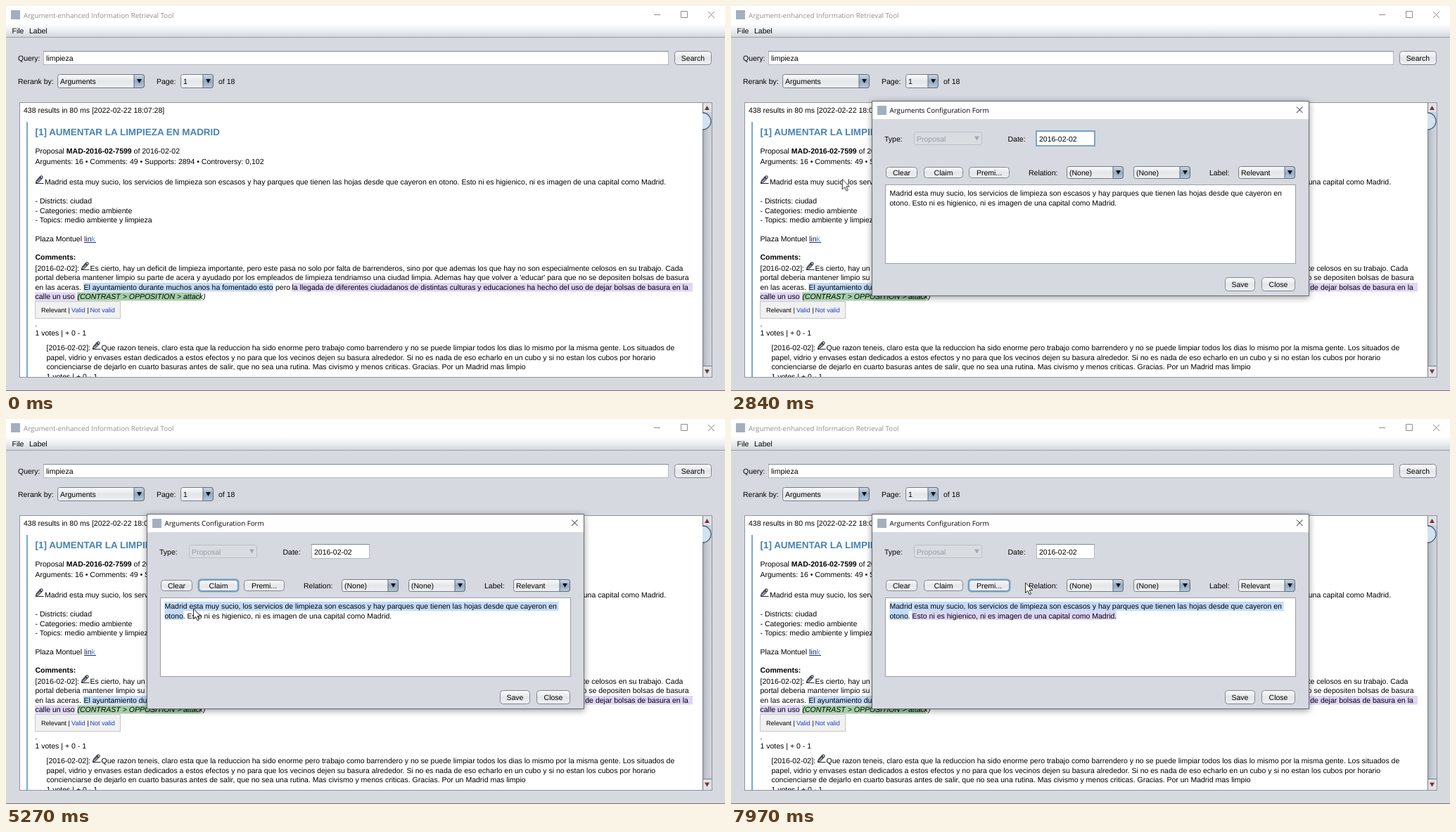
An HTML page for the animation above (8000 ms loop, 1022 by 548 pixels).

```html
<!DOCTYPE html>
<html lang="en">
<head>
<meta charset="utf-8">
<title>Argument search tool</title>
<style>
html, body { margin: 0; width: 100%; height: 100%; overflow: hidden; background: #d6d9df; }
svg { display: block; width: 1022px; height: 548px; }
text {
  font: 10.5px "Liberation Sans", Arial, sans-serif;
  fill: #000; white-space: pre; text-rendering: geometricPrecision;
}
.caption { font: 9.75px "Open Sans", "Noto Sans", sans-serif; }
.heading { font-size: 13.45px; font-weight: bold; fill: #4682b4; }
.bold { font-weight: bold; }
.small { font-size: 9.1px; }
.link { fill: #1a3fc4; }
.muted { fill: #9a9da3; }
.selected text { fill: #fff; }
.claim { fill: #c3dcf8; }
.premise { fill: #dfd5f6; }
.glyph { fill: none; stroke: #8c8c8c; }
.focus { fill: none; stroke: #6fa0cf; stroke-width: 1.8; }

/* Switches: hard on and off */
.switch { opacity: 0; animation: 8s step-end infinite; }
#activeTitle { animation-name: title-on; }
#arrow { animation-name: arrow-on; }
#hand { animation-name: hand-on; }
#press { animation-name: press-on; }
#dateFocus { animation-name: date-on; }
#areaFocus { animation-name: area-on; }
#claimFocus { animation-name: claim-focus; }
#premiseFocus { animation-name: premise-focus; }
#claimMark { animation-name: claim-on; }
#premiseMark { animation-name: premise-on; }
@keyframes title-on { 0%, 21.625% { opacity: 0 } 20.5% { opacity: 1 } }
@keyframes arrow-on { 0%, 17.875% { opacity: 0 } 9.375%, 31.125%, 100% { opacity: 1 } }
@keyframes hand-on { 0%, 31.125% { opacity: 0 } 17.875% { opacity: 1 } }
@keyframes press-on {
  0%, 21.625%, 51.625%, 60.875%, 83.75%, 95.75% { opacity: 0 }
  20.5%, 44%, 59.75%, 72.75%, 93.375% { opacity: .78 }
}
@keyframes date-on { 0% { opacity: 1 } 44%, 100% { opacity: 0 } }
@keyframes area-on { 0%, 59.75%, 93.375%, 100% { opacity: 0 } 44%, 72.75% { opacity: 1 } }
@keyframes claim-focus { 0%, 72.75%, 100% { opacity: 0 } 59.75% { opacity: 1 } }
@keyframes premise-focus { 0% { opacity: 0 } 93.375%, 100% { opacity: 1 } }
@keyframes claim-on { 0% { opacity: 0 } 60.875%, 100% { opacity: 1 } }
@keyframes premise-on { 0% { opacity: 0 } 95.75%, 100% { opacity: 1 } }

/* Dragged text selections */
#sel1 { animation: sel1 8s linear infinite; }
#sel2 { animation: sel2 8s linear infinite; }
#sel3 { animation: sel3 8s linear infinite; }
@keyframes sel1 {
  0%, 44% { width: 0 } 45.875%, 46.374% { width: 7.5px }
  46.375%, 59.749% { width: 560px } 59.75%, 100% { width: 0 }
}
@keyframes sel2 {
  0%, 46.374% { width: 0 } 46.375% { width: 14px }
  47.375%, 59.749% { width: 26px } 59.75%, 100% { width: 0 }
}
@keyframes sel3 {
  0%, 72.75% { width: 0 } 78.125% { width: 212px } 82.125% { width: 288px }
  82.875%, 93.374% { width: 291px } 93.375%, 100% { width: 0 }
}

#dialog { transform-origin: 511px 274px; animation: open 8s ease-out infinite; }
@keyframes open {
  0%, 21.625% { opacity: 0; transform: scale(.92) }
  23.125%, 100% { opacity: 1; transform: none }
}

#pointer { animation: move 8s ease-in-out infinite; }
@keyframes move {
  0%, 9.375% { transform: translate(612px, 420px) }
  11.375%, 14.125% { transform: translate(80px, 216px) }
  18.25%, 31.125% { transform: translate(49px, 247px) }
  34% { transform: translate(110px, 238px); animation-timing-function: linear }
  38% { transform: translate(236px, 260px) }
  40.125%, 44% { transform: translate(225px, 266px) }
  45.875% { transform: translate(235px, 271px); animation-timing-function: linear }
  47.375%, 55.125% { transform: translate(250px, 281px) }
  58.75%, 62% { transform: translate(290px, 238px) }
  65.125% { transform: translate(274px, 263px); animation-timing-function: linear }
  65.875% { transform: translate(266px, 270px) }
  69.625% { transform: translate(259px, 274px) }
  72.75% { transform: translate(259px, 274px); animation-timing-function: linear }
  78.125% { transform: translate(469px, 286px); animation-timing-function: linear }
  82.125% { transform: translate(545px, 288px) }
  82.875%, 87.25% { transform: translate(547px, 288px) }
  91.5%, 99.624% { transform: translate(357px, 232px) }
  99.625%, 100% { transform: translate(418px, 233px) }
}
</style>
</head>
<body>
<svg viewBox="0 0 1022 548">
  <defs>
    <linearGradient id="menuFill" x2="0" y2="1"><stop stop-color="#fff"/><stop offset=".5" stop-color="#eceef1"/><stop offset="1" stop-color="#d3d6dc"/></linearGradient>
    <linearGradient id="buttonFill" x2="0" y2="1"><stop stop-color="#fcfcfd"/><stop offset=".5" stop-color="#e3e6ea"/><stop offset="1" stop-color="#eff1f4"/></linearGradient>
    <linearGradient id="arrowFill" x2="0" y2="1"><stop stop-color="#cfdbe8"/><stop offset=".5" stop-color="#94a9c0"/><stop offset="1" stop-color="#b9cadb"/></linearGradient>
    <linearGradient id="trackFill" x2="1"><stop stop-color="#a9aeb9"/><stop offset=".5" stop-color="#c6cad2"/><stop offset="1" stop-color="#d2d5dc"/></linearGradient>
    <clipPath id="page"><rect x="20" y="138" width="970" height="390"/></clipPath>
    <clipPath id="bar"><rect x="990" y="138" width="13" height="390"/></clipPath>
    <clipPath id="dragged">
      <rect id="sel1" x="225.5" y="260" width="0" height="13"/>
      <rect id="sel2" x="225.5" y="273" width="0" height="13.5"/>
      <rect id="sel3" x="257" y="273" width="0" height="13.5"/>
    </clipPath>
    <g id="pencil" fill="#fff" stroke="#1d2433" stroke-width="1.1" stroke-linejoin="round">
      <path d="M1.5 10.5 2.5 7.3 8.2 1.2Q9.4.3 10.5 1.3T10.8 3.6L5 9.7Z"/>
      <path d="M7 2.5 9.5 5M3.4 8.4 9 2.6M1 11.5H12.5" fill="none"/>
    </g>
    <g id="message">
      <text x="225.5" y="270">Madrid esta muy sucio, los servicios de limpieza son escasos y hay parques que tienen las hojas desde que cayeron en</text>
      <text x="225.5" y="283.5">otono. Esto ni es higienico, ni es imagen de una capital como Madrid.</text>
    </g>
  </defs>

  <rect width="1022" height="548" fill="#d6d9df"/>
  <rect width="1022" height="25" fill="#fff"/>
  <rect x="7" y="6" width="13" height="13" fill="#a3afbf"/>
  <text class="caption" x="25" y="16.5" style="fill:#8f8f8f">Argument-enhanced Information Retrieval Tool</text>
  <text class="caption switch" id="activeTitle" x="25" y="16.5">Argument-enhanced Information Retrieval Tool</text>
  <path class="glyph" d="M921 12.5h9M959.5 7.5h9v9h-9zM998 8l9 9M1007 8l-9 9"/>
  <rect y="25" width="1022" height="19" fill="url(#menuFill)"/>
  <path d="M0 44.5H1022" stroke="#9ba0aa"/>
  <path d="M0 547.5H1022" stroke="#806c78"/>
  <text x="8.5" y="39">File</text>
  <text x="33" y="39">Label</text>
  <text x="17" y="78">Query:</text>
  <text x="17" y="111">Rerank by:</text>
  <text x="214" y="111">Page:</text>
  <text x="302" y="111">of 18</text>
  <g id="mainControls"></g>

  <rect x="19.5" y="137.5" width="984" height="391" fill="#fff" stroke="#8f949e"/>
  <g clip-path="url(#page)">
    <path d="M30 165V528" stroke="#5d92bf" stroke-width="1.6"/>
    <rect class="claim" x="110" y="394" width="270" height="12.5"/>
    <rect class="premise" x="406" y="394" width="570" height="12.5"/>
    <rect class="premise" x="41" y="407.5" width="58.5" height="12"/>
    <rect x="101" y="407.5" width="176.5" height="12" fill="#a5cda9"/>
    <text x="25" y="152">438 results in 80 ms [2022-02-22 18:07:28]</text>
    <text class="heading" x="41.5" y="184">[1] AUMENTAR LA LIMPIEZA EN MADRID</text>
    <text x="41.5" y="209.5">Proposal <tspan class="bold">MAD-2016-02-7599</tspan> of 2016-02-02</text>
    <text x="41.5" y="225">Arguments: 16 • Comments: 49 • Supports: 2894 • Controversy: 0,102</text>
    <use href="#pencil" x="41" y="241"/>
    <text x="55" y="254">Madrid esta muy sucio, los servicios de limpieza son escasos y hay parques que tienen las hojas desde que cayeron en otono. Esto ni es higienico, ni es imagen de una capital como Madrid.</text>
    <text x="41.5" y="281">- Districts: ciudad</text>
    <text x="41.5" y="294.5">- Categories: medio ambiente</text>
    <text x="41.5" y="308">- Topics: medio ambiente y limpieza</text>
    <text x="41.5" y="334.5">Plaza Montuel</text>
    <text x="111" y="334.5" style="fill:#141c55">lin<tspan fill="#4d8fe0">k</tspan></text>
    <path d="M111 336.5h17" stroke="#24307a"/>
    <text class="bold" x="41.5" y="360.5">Comments:</text>
    <text x="41.5" y="377">[2016-02-02]:</text>
    <use href="#pencil" x="106" y="364"/>
    <text x="119.5" y="377">Es cierto, hay un deficit de limpieza importante, pero este pasa no solo por falta de barrenderos, sino por que ademas los que hay no son especialmente celosos en su trabajo. Cada</text>
    <text x="41.5" y="390">portal deberia mantener limpio su parte de acera y ayudado por los empleados de limpieza tendriamso una ciudad limpia. Ademas hay que volver a 'educar' para que no se depositen bolsas de basura</text>
    <text x="41.5" y="404">en las aceras.</text>
    <text x="110.5" y="404">El ayuntamiento durante muchos anos ha fomentado esto</text>
    <text x="383" y="404">pero</text>
    <text x="406.5" y="404">la llegada de diferentes ciudadanos de distintas culturas y educaciones ha hecho del uso de dejar bolsas de basura en la</text>
    <text x="41.5" y="417">calle un uso</text>
    <text x="101.5" y="417" font-style="italic" style="font-style:italic">(CONTRAST &gt; OPPOSITION &gt; attack)</text>
    <rect x="41.5" y="420.5" width="121" height="24" fill="#f1f1f1" stroke="#c6c6c6"/>
    <text class="small" x="50" y="436">Relevant |</text>
    <text class="small link" x="93" y="436">Valid</text>
    <text class="small" x="115.5" y="436">|</text>
    <text class="small link" x="119.5" y="436">Not valid</text>
    <text x="41.5" y="456">.</text>
    <text x="41.5" y="469">1 votes | + 0 - 1</text>
    <text x="57.5" y="490">[2016-02-02]:</text>
    <use href="#pencil" x="122" y="477"/>
    <text x="135.5" y="490">Que razon teneis, claro esta que la reduccion ha sido enorme pero trabajo como barrendero y no se puede limpiar todos los dias lo mismo por la misma gente. Los situados de</text>
    <text x="57.5" y="504">papel, vidrio y envases estan dedicados a estos efectos y no para que los vecinos dejen su basura alrededor. Si no es nada de eso echarlo en un cubo y si no estan los cubos por horario</text>
    <text x="57.5" y="517">concienciarse de dejarlo en cuarto basuras antes de salir, que no sea una rutina. Mas civismo y menos criticas. Gracias. Por un Madrid mas limpio</text>
    <text x="57.5" y="530.5">1 votes | + 0 - 1</text>
  </g>
  <g clip-path="url(#bar)">
    <rect x="990" y="138" width="13" height="390" fill="url(#trackFill)"/>
    <path d="M990 138h13v13h-13zM990 513h13v15h-13z" fill="#dfe2e7"/>
    <path d="M990.5 138V528M990 512.5h13" stroke="#777c87"/>
    <path d="M993 148l3.5-6 3.5 6zM993 517.5l3.5 6 3.5-6z" fill="#7b3038"/>
    <circle cx="990" cy="164" r="12" fill="#d3e2f1" stroke="#455f7c" stroke-width="1.3"/>
  </g>

  <g id="dialog">
    <rect x="200.5" y="135.5" width="621" height="277" fill="#d6d9df" stroke="#656a73" style="filter:drop-shadow(0 2px 5px rgba(0,0,0,.4))"/>
    <rect x="201" y="136" width="620" height="25" fill="#fff"/>
    <rect x="208" y="142" width="13" height="13" fill="#a3afbf"/>
    <text class="caption" x="225.5" y="152">Arguments Configuration Form</text>
    <path d="M804 143.5l8.5 8.5M812.5 143.5L804 152" stroke="#222"/>
    <text x="218" y="192.5">Type:</text>
    <text x="393.5" y="192.5">Date:</text>
    <text x="423" y="241">Relation:</text>
    <text x="680" y="241">Label:</text>
    <g id="dialogControls"></g>
    <rect class="focus switch" id="dateFocus" x="434" y="178" width="83" height="21"/>
    <rect class="focus switch" id="areaFocus" x="219" y="254" width="584" height="113"/>
    <rect class="focus switch" id="claimFocus" x="273.5" y="228.5" width="57" height="17" rx="4"/>
    <rect class="focus switch" id="premiseFocus" x="337.5" y="228.5" width="59" height="17" rx="4"/>
    <path class="claim switch" id="claimMark" d="M225.5 260h560v13h-533v13h-27z"/>
    <path class="premise switch" id="premiseMark" d="M257 273h291v13h-291z"/>
    <use href="#message"/>
    <g class="selected" clip-path="url(#dragged)">
      <rect x="225" y="260" width="562" height="27" fill="#39648a"/>
      <text x="225.5" y="270">Madrid esta muy sucio, los servicios de limpieza son escasos y hay parques que tienen las hojas desde que cayeron en</text>
      <text x="225.5" y="283.5">otono. Esto ni es higienico, ni es imagen de una capital como Madrid.</text>
    </g>
  </g>

  <g id="pointer">
    <circle class="switch" id="press" r="10" fill="#f7e63a"/>
    <path class="switch" id="arrow" d="M.5 0V14.5L3.8 11.5 6.2 16.8 8.5 15.8 6.2 10.6H10.5Z" fill="#fff" stroke="#111" stroke-width=".9"/>
    <path class="switch" id="hand" d="M-1.8 1.5Q0-1.2 1.6 1.5V7.2Q3.4 5.8 4.4 7.8 6 6.6 7 8.6 8.8 7.8 9 10.2V13.5Q8.8 16 7.4 19H-.6Q-1.6 16.5-5.4 12.3-6 9.6-3.4 10.4L-1.8 12ZM1.6 7.2V11M4.4 7.8V11M7 8.6V11.5" fill="#fff" stroke="#111"/>
  </g>
</svg>
<script>
const label = (x, y, text, attrs = '') => `<text x="${x}" y="${y}" ${attrs}>${text}</text>`;

const box = (x, y, w, h, fill, stroke, rx = 0) =>
  `<rect x="${x + .5}" y="${y + .5}" width="${w - 1}" height="${h - 1}" rx="${rx}" fill="${fill}" stroke="${stroke}"/>`;

const button = (x, y, w, h, text) =>
  box(x, y, w, h, 'url(#buttonFill)', '#80868f', 4) +
  label(x + w / 2, y + h / 2 + 4, text, 'text-anchor="middle"');

const field = (x, y, w, h, text) =>
  box(x, y, w, h, '#fff', '#b4b8c0') +
  `<path d="M${x} ${y + .5}h${w}" stroke="#858a93"/>` +
  label(x + 4, y + h / 2 + 4, text);

function combo(x, y, w, h, text, enabled = true) {
  const right = x + w, mid = y + h / 2;
  const arrow = `<path d="M${right - 11} ${mid - 3}h7l-3.5 6z" fill="${enabled ? '#111' : '#a4a8af'}"/>`;
  if (!enabled) {
    return box(x, y, w, h, '#d9dce1', '#bcc0c7', 3) + label(x + 4, mid + 4, text, 'class="muted"') + arrow;
  }
  return box(x, y, w, h, 'url(#buttonFill)', '#777d88', 3) +
    `<path d="M${right - 15} ${y + .5}h11q3.5 0 3.5 3.5v${h - 8}q0 3.5-3.5 3.5h-11z" fill="url(#arrowFill)" stroke="#5f6d80"/>` +
    label(x + 4, mid + 4, text) + arrow;
}

document.getElementById('mainControls').innerHTML =
  field(53, 64, 889, 20, 'limpieza') +
  button(950, 64, 53, 20, 'Search') +
  combo(73, 97, 124, 20, 'Arguments') +
  combo(248, 97, 47, 20, '1');

document.getElementById('dialogControls').innerHTML =
  combo(260, 179, 97, 19, 'Proposal', false) +
  field(434, 178, 83, 21, '2016-02-02') +
  button(220, 229, 45, 16, 'Clear') +
  button(274, 229, 56, 16, 'Claim') +
  button(338, 229, 58, 16, 'Premi...') +
  combo(477, 228, 81, 18, '(None)') +
  combo(572, 228, 81, 18, '(None)') +
  combo(721, 228, 81, 18, 'Relevant') +
  box(219, 254, 584, 113, '#fff', '#9a9fa8') +
  button(702, 386, 43, 20, 'Save') +
  button(754, 386, 48, 20, 'Close');
</script>
</body>
</html>
```
